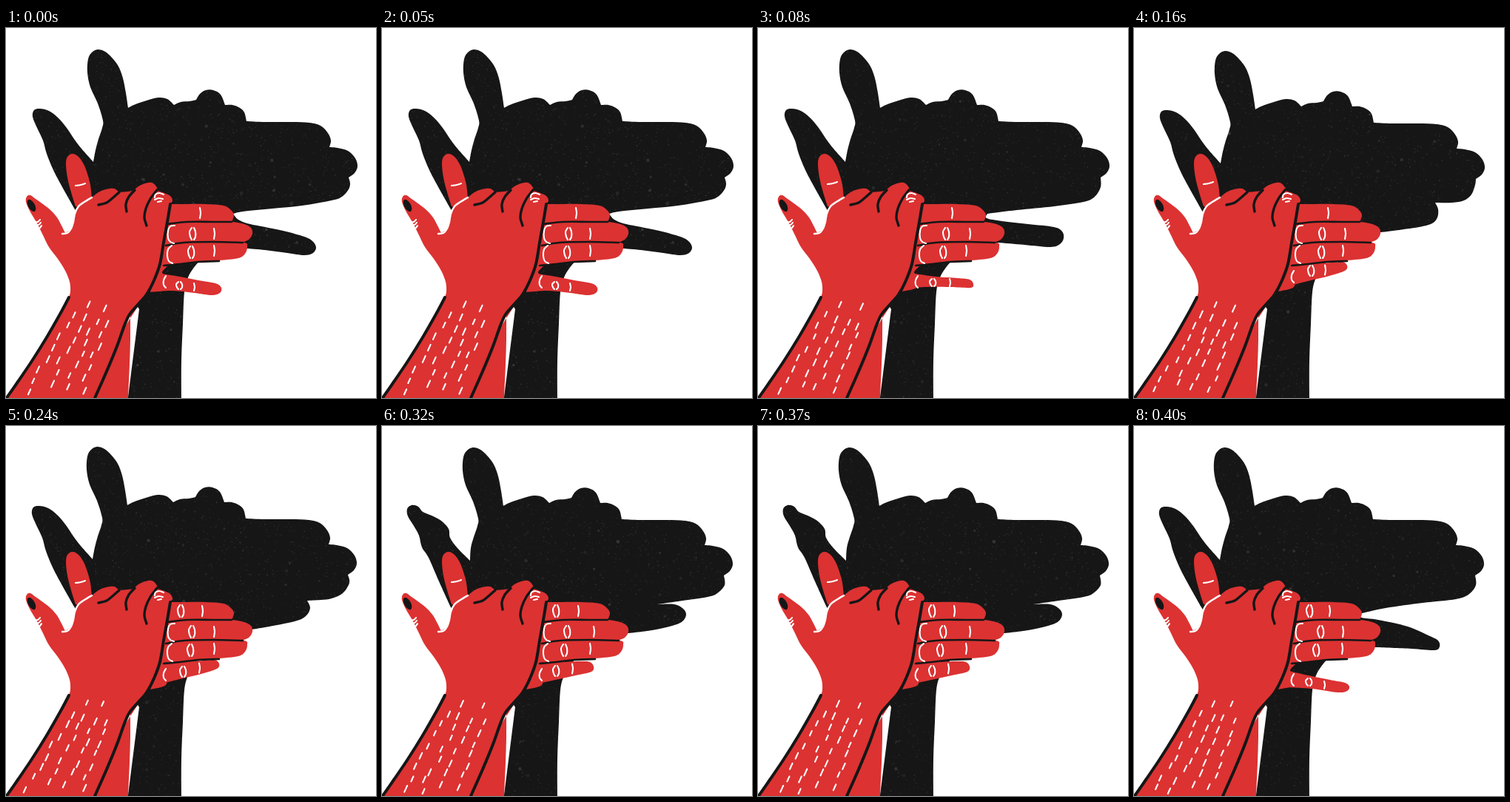
Animation of 500 by 500 pixels, one loop 480 ms. Source, as an HTML page with a canvas:

```html
<!DOCTYPE html>
<html lang="en">
<head>
<meta charset="utf-8">
<title>Shadow puppet</title>
<style>
  html, body { margin: 0; width: 100%; height: 100%; overflow: hidden; background: #fff; }
  canvas { display: block; width: 100%; height: 100%; }
</style>
</head>
<body>
<canvas id="stage" width="500" height="500"></canvas>
<script>
const SIZE = 500, STEP = 80;
const RED = '#dc3232', INK = '#161616', WHITE = '#fff';

// Outlines are "x,y x,y" points joined by a smooth curve; "|" makes the last point a corner.
const EAR = '93,245 75,213 64,192 55,170 50,152 42,135 36,120 38,111 46,109 58,112 70,121 82,135 92,150 102,163 118,181 |';
const EAR_BENT = '93,245 77,210 63,178 54,164 50,148 43,135 35,122 34,112 40,107 49,109 55,116 67,121 80,128 90,139 92,151 102,165 119,182 |';
const HEAD = '121,165 125,150 130,135 131,125 124,102 114,80 110,60 111,42 116,33 124,29 134,32 143,40 152,52 158,68 162,88 165,108 |' +
  '175,103 190,98 206,94 218,96 227,104 | 236,100 248,99 257,97 | 262,89 270,84 280,84 290,90 296,104 |' +
  '306,104 316,108 322,114 325,126 | 350,127 385,127 410,128 425,132 435,142 439,152 437,161 |' +
  '448,162 462,166 472,176 475,187 471,196 463,202 |';
const FOREARM = '| 262,314 | 253,325 246,337 241,357 239,400 237,450 237,500 | 165,500 | 180,380 |';

const BACK_ARM = '205,335 | 190,360 168,385 | 168,420 167,455 165,500 | 118,500 | 150,420 |';
const INDEX = '94,241 88,222 83,202 81,184 83,174 90,170 98,174 105,184 110,197 114,212 116,229 | 112,245 |';
const FINGER1 = '216,238 | 240,238 270,238 294,240 304,246 308,253 305,262 | 214,266 |';
const FINGER2 = '216,264 | 245,262 290,262 306,262 322,265 331,270 333,278 328,286 318,290 | 214,293 |';
const FINGER3 = '216,290 | 245,289 290,289 322,290 326,296 323,305 314,311 288,314 258,316 235,319 | 214,321 |';
const PALM = '212,240 | 222,238 | 219,270 217,295 218,322 | 211,330 216,335 | 216,350 195,356 |';
const HAND_RIGHT = '222,238 218,262 213,290 208,319 200,341 190,360 178,374 167,387 160,402 150,430 136,464 120,500';
const ARM_LEFT = '85,364 75,383 55,418 35,450 16,478 0,501';
const HAND = '80,277 75,267 69,256 60,246 50,238 40,231 33,226 28,228 27,235 32,247 42,264 50,280 58,296 70,312 80,328 86,343 87,356 85,364 |' +
  '75,383 55,418 35,450 16,478 0,501 | 120,500 | 136,464 150,430 160,402 167,387 178,374 190,360 200,341 208,319 213,290 218,262 222,238 |' +
  '225,233 222,227 214,223 205,220 | 203,214 197,209 188,210 179,214 172,220 | 164,221 153,222 | 146,217 135,218 125,222 116,229 |' +
  '106,235 98,241 93,251 91,263 87,272 80,277 |';
const FOLDS = ['153,222 145,229 136,236 125,239', '174,219 166,228 162,238 163,248', '204,219 195,231 189,244 187,256 190,267'];

const CLOSED_PINKY = '214,320 | 240,318 270,317 282,316 288,321 285,328 264,335 235,342 196,352 |';
const CREASE_ROWS = [250, 278, 303];

// knuckles: [double crease x, single crease x] for each finger, top to bottom
const poses = [
  { shift: [0, 0], arm: 1, crease: 213,
    jaw: '465,210 463,218 454,228 440,233 400,240 360,244 320,248 307,251 | 314,259 330,265 370,273 400,281 413,287 419,296 415,304 403,307 380,304 350,300 325,298',
    pinky: '210,332 | 235,336 260,341 283,345 291,351 289,358 278,361 255,358 225,355 195,357 |',
    knuckles: [[0, 262], [252, 281], [250, 281], [234, 254]], rows: [348, 350] },
  { shift: [0, 0], arm: 2, crease: 211,
    jaw: '463,215 455,228 440,235 400,241 350,246 310,251 | 309,257 330,261 365,265 400,269 411,275 413,284 408,292 395,296 360,293 325,290',
    pinky: '212,332 | 240,336 270,338 286,340 291,346 287,351 260,350 225,350 197,353 |',
    knuckles: [[0, 262], [254, 286], [250, 281], [236, 259]], rows: [344, 344] },
  { shift: [-1, 2], arm: 3, crease: 211,
    jaw: '461,212 456,225 446,233 430,236 407,236 | 411,245 410,256 403,264 385,269 350,274 325,277',
    pinky: CLOSED_PINKY,
    knuckles: [[0, 262], [254, 285], [253, 282], [239, 258]], rows: [328, 327] },
  { shift: [-1, -1], arm: 4, crease: 212,
    jaw: '464,212 455,226 440,233 425,235 407,236 | 411,246 405,257 390,264 350,272 325,276',
    pinky: CLOSED_PINKY,
    knuckles: [[236, 265], [251, 281], [249, 281], [239, 261]], rows: [332, 327] },
  { shift: [-1, 0], arm: 5, crease: 211, bent: true,
    jaw: '463,215 453,226 440,231 400,237 372,241 | 395,241 407,247 411,255 406,264 392,270 365,276 325,281',
    pinky: '214,320 | 240,319 270,318 281,319 286,325 283,332 262,337 230,344 195,351 |',
    knuckles: [[235, 265], [250, 286], [246, 281], [235, 257]], rows: [331, 328] },
  { shift: [-2, 0], arm: 6, crease: 212,
    jaw: '462,215 453,227 435,234 390,239 340,246 304,254 | 308,259 330,262 370,271 400,284 411,290 413,298 406,303 375,301 325,299',
    pinky: '209,331 | 240,338 270,344 285,347 291,352 288,358 275,360 240,355 199,353 |',
    knuckles: [[237, 264], [252, 282], [246, 281], [236, 257]], rows: [346, 350] }
];

function random(seed) {
  let s = seed * 7919 + 17;
  return () => (s = (s * 16807) % 2147483647) / 2147483647;
}

function curve(text) {
  const path = new Path2D();
  let last = null;
  for (const part of text.split('|')) {
    const pts = part.trim().split(/\s+/).filter(Boolean).map(p => p.split(',').map(Number));
    if (!pts.length) continue;
    if (last) pts.unshift(last);
    else path.moveTo(...pts[0]);
    for (let i = 0; i < pts.length - 1; i++) {
      const b = pts[i], c = pts[i + 1], a = pts[i - 1] || b, d = pts[i + 2] || c;
      path.bezierCurveTo(b[0] + (c[0] - a[0]) / 6, b[1] + (c[1] - a[1]) / 6,
        c[0] - (d[0] - b[0]) / 6, c[1] - (d[1] - b[1]) / 6, c[0], c[1]);
    }
    last = pts[pts.length - 1];
  }
  return path;
}

const move = (text, [dx, dy]) =>
  text.replace(/(\d+),(\d+)/g, (m, x, y) => `${+x + dx},${+y + dy}`);

function grain(g, shadow, seed) {
  const rnd = random(seed);
  g.save();
  g.clip(shadow);
  for (let i = 0; i < 5000; i++) {
    g.fillStyle = `rgba(255,255,255,${rnd() * 0.1})`;
    g.fillRect(30 + rnd() * 450, 25 + rnd() * 475, 1 + rnd(), 1 + rnd());
  }
  for (let i = 0; i < 45; i++) {
    g.fillStyle = `rgba(255,255,255,${0.04 + rnd() * 0.1})`;
    g.beginPath();
    g.arc(110 + rnd() * 340, 90 + rnd() * 400, 0.8 + rnd() * 1.6, 0, 7);
    g.fill();
  }
  g.restore();
}

function paint(pose) {
  const sheet = document.createElement('canvas');
  sheet.width = sheet.height = SIZE;
  const g = sheet.getContext('2d');
  g.lineCap = g.lineJoin = 'round';
  const fill = (text, color) => { g.fillStyle = color; g.fill(curve(text)); };
  const line = (text, color, width) => {
    g.strokeStyle = color;
    g.lineWidth = width;
    g.stroke(curve(text));
  };
  const mark = text => line(text, WHITE, 2.1);
  const single = (x, y, h) => mark(`${x},${y - h} ${x + 1},${y} ${x},${y + h}`);
  const double = (x, y, h) => {
    mark(`${x - 1},${y - h} ${x - 4},${y - h / 3} ${x - 3},${y + h / 2} ${x - 1},${y + h}`);
    mark(`${x + 2},${y - h} ${x + 4},${y - h / 3} ${x + 4},${y + h / 2} ${x + 2},${y + h}`);
  };

  g.fillStyle = WHITE;
  g.fillRect(0, 0, SIZE, SIZE);

  const top = (pose.bent ? EAR_BENT : move(EAR, pose.shift)) + move(HEAD, pose.shift);
  const outline = top + pose.jaw + FOREARM;
  fill(outline, INK);
  grain(g, curve(outline), pose.arm);

  [BACK_ARM, PALM, pose.pinky, FINGER3, FINGER2, FINGER1, INDEX].forEach(s => fill(s, RED));
  line('217,265 245,262 280,262 305,262', INK, 2.6);
  line('216,294 240,290 280,289 320,290', INK, 2.6);
  line('213,321 235,319 260,316 288,315', INK, 2.6);

  // creases of the far hand
  pose.knuckles.forEach(([two, one], i) => {
    const open = pose.rows[0] > 340;
    const y = i < 3 ? CREASE_ROWS[i] : 0;
    if (two) double(two, y || pose.rows[0], y ? 8 : open ? 5 : 7);
    single(one, y ? y - (i === 2 ? 2 : 0) : pose.rows[1], y ? 7 : open ? 5 : 6.5);
  });
  mark('228,267 222,268 219,274 219,284 222,289 227,291');
  mark('224,294 219,299 218,308 220,315 225,318');
  const low = pose.rows[0] > 340 ? 335 : 328;
  mark(`216,${low} 213,${low + 6} 213,${low + 12} 216,${low + 16}`);
  mark(`94,${pose.crease} 101,${pose.crease - 1} 107,${pose.crease - 3}`);

  fill(HAND, RED);
  line(HAND_RIGHT, INK, 4);
  line(ARM_LEFT, INK, 4);
  FOLDS.forEach(s => line(s, INK, 3.4));
  line('76,278 83,277 88,271 91,262 93,251 98,241 106,235 116,229', WHITE, 2.4);

  // nails and thumb wrinkles
  g.fillStyle = INK;
  g.beginPath();
  g.ellipse(34.5, 240, 4.5, 9, -0.5, 0, 7);
  g.fill();
  mark('39,262 43,262 46,259');
  mark('41,267 44,266 47,263');
  mark('43,272 46,270 48,267');
  mark('201,229 202,225 207,223 213,225');
  mark('201,232 206,230 212,231');
  mark('205,235 210,234');

  // arm hair
  const rnd = random(pose.arm * 31);
  for (let row = 0; row < 9; row++) {
    const y = 371 + row * 14.5;
    const left = 93 - row * 9.3, right = 150 - row * 5.2;
    const count = row < 1 ? 2 : 4;
    for (let i = 0; i < count; i++) {
      const x = left + (right - left) * (i + 0.35 + rnd() * 0.4) / count;
      const y0 = y + i * 4 + rnd() * 5 - 3, h = 6 + rnd() * 3;
      if (y0 + h < 497) mark(`${x},${y0} ${x - h * 0.45},${y0 + h}`);
    }
  }
  return sheet;
}

const sheets = poses.map(paint);
const ctx = document.getElementById('stage').getContext('2d');

function play(now) {
  ctx.drawImage(sheets[Math.floor(now / STEP) % sheets.length], 0, 0);
  requestAnimationFrame(play);
}
play(performance.now());
</script>
</body>
</html>
```
